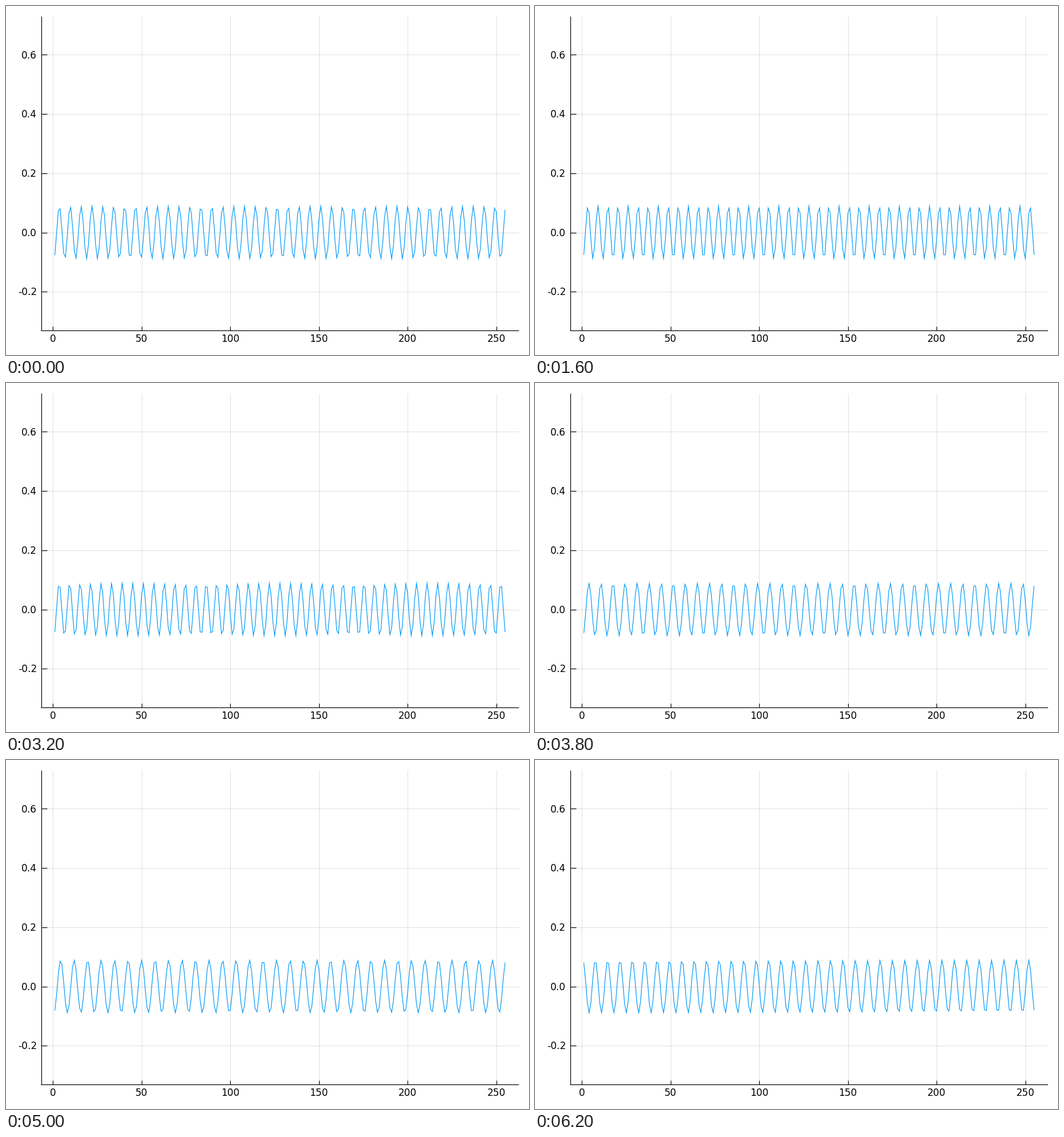
A matplotlib script for the animation above (6400 ms loop, 917 by 611 pixels).

```python
import numpy as np
import matplotlib.pyplot as plt
from matplotlib.animation import FuncAnimation
from matplotlib.patches import Polygon

WIDTH, HEIGHT, DPI = 917, 611, 64
PX = 72 / DPI  # one pixel in points
LEFT, RIGHT, TOP, BOTTOM = 61.9, 898.8, 18.0, 567.6
X0, X_SCALE = 82.45, 3.1084
Y0, Y_SCALE = 396.5, 518.5
LINE_WIDTH = 1.2
N = 255

# Wave number of the cosine mode shown at each step
MODES = [83, 80, 85, 78, 87, 82, 88, 84, 90, 81, 89, 91, 79, 92, 94, 77,
         86, 93, 66, 75, 97, 95, 74, 72, 70, 67, 69, 76, 68, 71, 96, 73]
POSITIVE_MODE = 73

plt.rcParams["font.family"] = "DejaVu Sans"
fig = plt.figure(figsize=(WIDTH / DPI, HEIGHT / DPI), dpi=DPI, facecolor="white")
ax = fig.add_axes([0, 0, 1, 1])
ax.set_xlim(0, WIDTH)
ax.set_ylim(HEIGHT, 0)
ax.axis("off")


def to_px(x, y):
    return X0 + x * X_SCALE, Y0 - y * Y_SCALE


def segment(x, y, width, **style):
    ax.plot(x, y, color="black", lw=width * PX, solid_capstyle="butt", **style)


def label(x, y, text, ha):
    ax.text(x, y, text, ha=ha, va="baseline", fontsize=17 * PX)


def draw_axes():
    for value in range(0, 251, 50):
        x, _ = to_px(value, 0)
        segment([x, x], [TOP, BOTTOM], 1, alpha=0.12, zorder=1)
        segment([x, x], [BOTTOM - 6.5, BOTTOM], 1.2, zorder=3)
        label(x, 588.2, str(value), "center")
    for value in (-0.2, 0.0, 0.2, 0.4, 0.6):
        _, y = to_px(0, value)
        segment([LEFT, RIGHT], [y, y], 1, alpha=0.12, zorder=1)
        segment([LEFT, LEFT + 9.7], [y, y], 1.2, zorder=3)
        label(54.3, y + 6.3, f"{value:.1f}", "right")
    segment([LEFT, LEFT], [TOP, BOTTOM + 0.6], 1.2, zorder=3)
    segment([LEFT - 0.6, RIGHT], [BOTTOM, BOTTOM], 1.2, zorder=3)


def mode_points(k):
    j = np.arange(1, N + 1)
    sign = 1 if k == POSITIVE_MODE else -1
    wave = sign * np.sqrt(2 / N) * np.cos(k * np.pi * (j - 0.5) / N)
    return np.column_stack(to_px(j, wave))


def mitred_outline(points, width):
    """Outline of a polyline whose sharp corners keep their full mitres."""
    step = np.diff(points, axis=0)
    step /= np.linalg.norm(step, axis=1, keepdims=True)
    normal = np.column_stack([-step[:, 1], step[:, 0]])
    before = np.vstack([normal[:1], normal])
    after = np.vstack([normal, normal[-1:]])
    dot = np.sum(before * after, axis=1, keepdims=True)
    offset = (before + after) / (1 + dot) * width / 2
    return np.vstack([points + offset, (points - offset)[::-1]])


def update(frame):
    curve.set_xy(mitred_outline(mode_points(MODES[frame]), LINE_WIDTH))
    return (curve,)


draw_axes()
curve = ax.add_patch(Polygon(mitred_outline(mode_points(MODES[0]), LINE_WIDTH),
                             facecolor="#009AF9", edgecolor="none", lw=0, zorder=2))
anim = FuncAnimation(fig, update, frames=len(MODES), interval=200,
                     repeat=True, repeat_delay=0, blit=False)
plt.show()
```
